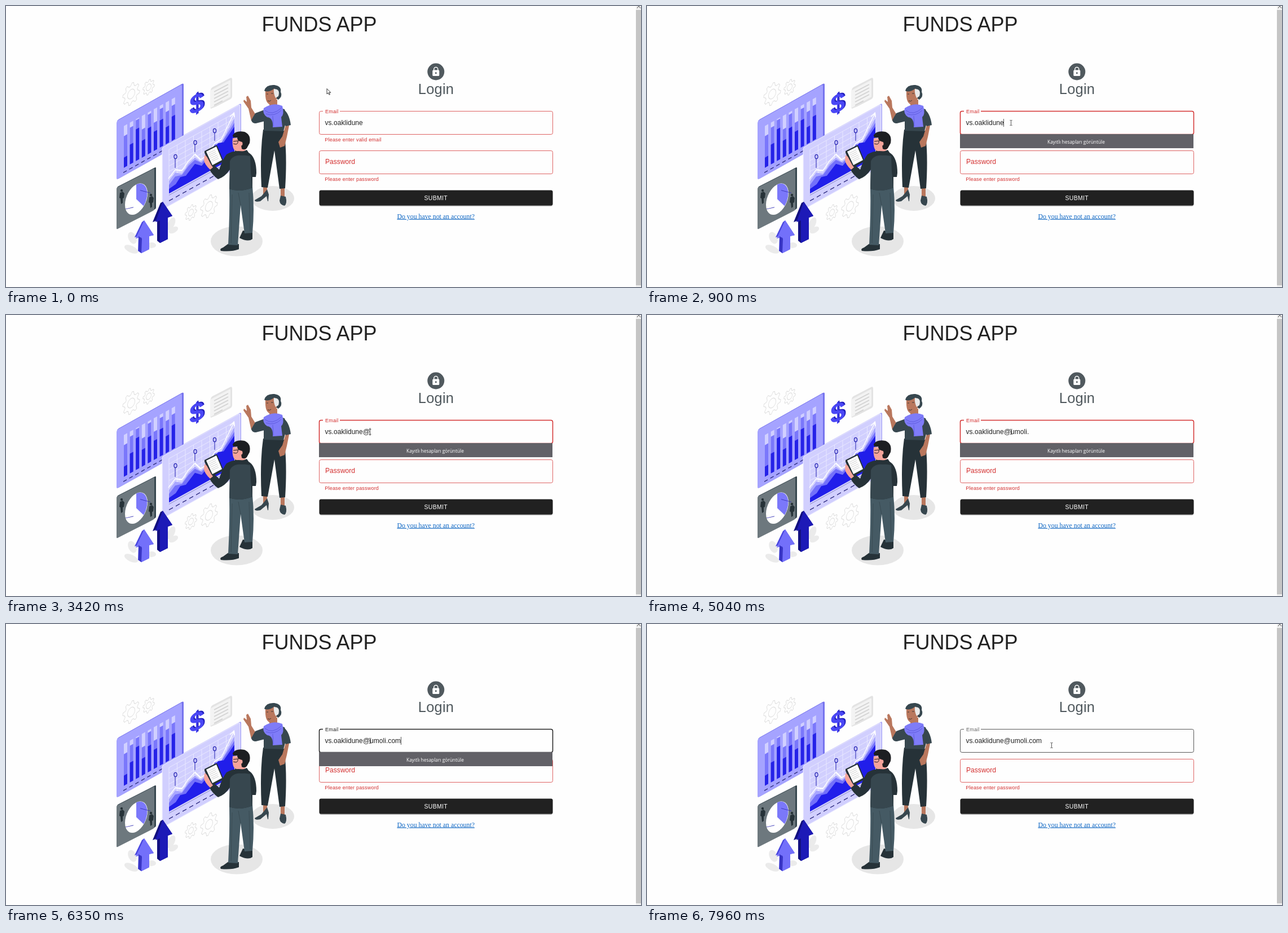
An HTML page that plays this animation: 1126x498 px, repeating every 8000 ms.

```html
<!DOCTYPE html>
<html lang="en">
<head>
<meta charset="utf-8">
<title>Login form</title>
<style>
  html, body { margin: 0; width: 100%; height: 100%; overflow: hidden; background: #fefefe; }
  svg { display: block; width: 1126px; height: 498px; }
  text { font-family: "Liberation Sans", Arial, sans-serif; fill: #212121; white-space: pre; }
  .mid { text-anchor: middle; }
  .body { font-size: 12px; letter-spacing: .05px; }
  .small { font-size: 9px; letter-spacing: .2px; }
  .error { fill: #d32f2f; }
  .box { fill: none; stroke: #d32f2f; stroke-width: .75; }
  .gear { fill: none; stroke: #e0e0e0; stroke-width: 1.2; }
  .leaf { fill: #ebebeb; }
  .dark { fill: #263238; }
  .slate { fill: #37474f; }
  .tan { fill: #b9775d; }
  .pink { fill: #f5a49b; }
</style>
</head>
<body>
<svg viewBox="0 0 1126 498">
  <g id="scrollbar">
    <rect x="1117" width="9" height="498" fill="#f1f1f1"/>
    <rect x="1117" y="7" width="9" height="488" fill="#c5c5c5"/>
    <path d="M1119 4l3-4 3 4" fill="none" stroke="#505050"/>
  </g>
  <text class="mid" x="555.5" y="45" font-size="36">FUNDS APP</text>

  <g id="scenery">
    <ellipse cx="473" cy="341" rx="38" ry="22" fill="#e6e6e6"/>
    <ellipse cx="409" cy="417" rx="46" ry="26.5" fill="#e6e6e6"/>
    <g id="gears" class="gear"></g>
    <path d="M363 149q0-3 3-5l31-16q4-2 4 2v30q0 3-3 5l-25 13-10 4z" fill="#e3e3e3"/>
    <path d="M362 150l34-18q2-1 2 1v28l-27 15-9 5z" fill="#f3f3f3"/>
    <path d="M369 152l25-13m-25 19l25-13m-25 19l25-13m-25 19l25-13m-25 19l15-8" stroke="#d2d2d2" stroke-width="1.7"/>
    <g transform="matrix(1 -.4 0 1 325 194)" font-size="47" font-weight="bold">
      <text x="2" y="-1" style="fill:#201dbb">$</text>
      <text x="0" y="0" style="fill:#4a47f5">$</text>
    </g>
  </g>

  <g transform="matrix(1 -.56 0 1 196 204)">
    <rect x="1" y="-1" width="118" height="105" rx="3" fill="#7673ed"/>
    <rect width="116" height="104" rx="3" fill="#a5a3ff"/>
    <g id="bars"></g>
    <path d="M12 98H106" stroke="#29277d" stroke-width="1.5" stroke-dasharray="6 4.6"/>
  </g>

  <g transform="matrix(1 -.555 0 1 277 251)">
    <rect x="1" y="-1" width="139" height="110" rx="3" fill="#a4a2f7"/>
    <rect width="138" height="110" rx="3" fill="#d4d3ff" fill-opacity=".94" stroke="#efeeff"/>
    <path id="grid" stroke="#eeeeff" stroke-width=".8"/>
    <path d="M12 88V66l11-9 12 9 11-11 12-5 10 13 12-2 13-13 12 1 23-30V88z" fill="#a8a6ff"/>
    <path d="M12 88V73l11-9 12 4 12-10 11-4 12 12 11-6 12-14 12 4 23-23V88z" fill="#7370fa"/>
    <path d="M12 88V80l12-2 8-8 10 3 16-12 12 10 12-8 17-16 10 4 19-17V88z" fill="#211eea"/>
    <path d="M11 61l12-9 12 8 11-10 12-6 10 15 12-1 13-14 12-1 22-33m-7 2l7-3 1 8" fill="none" stroke="#fff" stroke-width="1.8"/>
    <path d="M12 91H128" stroke="#7c7ab6" stroke-width=".7"/>
    <path d="M12 101H128" stroke="#29277d" stroke-width="1.5" stroke-dasharray="7 5"/>
  </g>
  <path d="M300 270v17m35-41v13m35-34v14" stroke="#2522b0"/>
  <g fill="#c5c3ff" stroke="#2522b0" stroke-width="1.2">
    <ellipse cx="300.5" cy="267" rx="2.6" ry="3.6"/><ellipse cx="335.5" cy="242" rx="2.6" ry="3.6"/><ellipse cx="370" cy="221" rx="2.6" ry="3.6"/>
  </g>

  <g transform="matrix(1 -.51 0 1 196 322)">
    <rect x="1" y="-1" width="69" height="74" rx="2" fill="#37474f"/>
    <rect width="67" height="74" rx="2" fill="#6d787e"/>
    <ellipse cx="35" cy="38" rx="20" ry="26" fill="#fff"/>
    <path d="M35 38V12a20 26 0 0 1 13 45z" fill="#7b78fa"/>
    <path d="M42 26l18 14M30 50l-14-4" stroke="#3431b5" stroke-width=".8"/>
  </g>
  <g class="dark">
    <path d="M202 331l5-2 3 3-1 8-2 1v8l-3 2-1-10-2-1z"/><circle cx="205" cy="327" r="2.2"/>
    <path d="M254 339l5-2 3 3-1 8-2 1v7l-3 2-1-9-2-1z"/><circle cx="257" cy="335" r="2.2"/>
  </g>

  <g class="leaf">
    <ellipse cx="224" cy="411" rx="7" ry="11" transform="rotate(-25 224 411)"/>
    <ellipse cx="222" cy="431" rx="13" ry="6" transform="rotate(25 222 431)"/>
    <ellipse cx="258" cy="424" rx="8" ry="5"/>
    <ellipse cx="293" cy="386" rx="6" ry="12" transform="rotate(25 293 386)"/>
    <ellipse cx="297" cy="397" rx="9" ry="5" transform="rotate(-30 297 397)"/>
  </g>
  <path d="M241 383l4-3 17 26-9 2 1 23-14 7-6-4 1-26-7 2z" fill="#4a47df"/>
  <path d="M245 380l17 26-8 2v23l-14 7v-28l-10 2z" fill="#7370fa"/>
  <path d="M235 408l6 4-1 26-5-4z" fill="#3734c4"/>
  <path d="M274 349l4-2 17 25-8 3v38l-14 7-5-4v-36l-8 3z" fill="#121080"/>
  <path d="M278 347l17 25-8 3v38l-14 7v-40l-8 3z" fill="#1d1ab7"/>

  <g id="woman">
    <path class="tan" d="M435 204l-5-22-9-13 1-3 5 4-1-9 3-2 5 9 1 12 8 13z"/>
    <path class="slate" d="M435 202l7-12 16-6 5 19-20 5q-7 0-8-6z"/>
    <path class="tan" d="M456 320h7v14h-7zM487 322h7v16h-7zM467 166h14v16h-14z"/>
    <path class="dark" d="M456 219l37 2q6 41 2 102l-10 1-9-68-12 66-11-1q-3-60 3-102z"/>
    <path class="slate" d="M457 184q17-8 37-1l4 17-6 22-35-1z"/>
    <path class="tan" d="M496 211l6 1-4 20-4 16-8 3-3-10 7-10z"/>
    <path class="slate" d="M490 182q12 6 15 29l-9 2-6-11z"/>
    <path d="M457 181q17-11 33-4 4 15-2 20l2 17-17 1q1-17-10-18-9-6-6-16z" fill="#7f7cf8"/>
    <path d="M459 185q13 11 30-5m-28 11q14 6 27-6m-15 10l1 19" fill="none" stroke="#5754d8" stroke-width=".8"/>
    <path class="slate" d="M458 150q3-11 18-10 13 2 11 12 4 8-4 14l-13-7z"/>
    <path class="tan" d="M460 151q8 2 16-5 5 10 4 18-4 11-13 10-8-3-7-23z"/>
    <path d="M475 147q12 0 8 13l-5 3q-4-9-3-16z" fill="#e9e9e9"/>
    <path d="M462 156h3m5-1h4m-10 13q4 2 6-1" fill="none" stroke="#37312f" stroke-width=".9"/>
    <path class="slate" d="M463 325l3 9-1 12h-1l-2-9-11 9q-10 2-10-2l12-7zM487 336l9 2q3 12-2 16-8-1-9-9z"/>
  </g>

  <g id="man">
    <path class="pink" d="M402 234q-2 20 6 24l10 5 9-11 2-16z"/>
    <path d="M402 229q5-9 21-6 12 5 9 20l-5 9q-4 4-9 1l-2-13q-6-1-6-7-8 2-8-4z" fill="#1d1f22"/>
    <ellipse class="pink" cx="417" cy="244" rx="2.500" ry="3.500"/>
    <path d="M403 240l8-1q1 6-4 6l-4-1m8-5l6-1" fill="none" stroke="#1d1f22"/>
    <path class="dark" d="M420 398l17 2v13q-8 6-23-2zM396 420l17 2v9q-13 5-32 3-3-4 4-6z"/>
    <path d="M396 322q20 8 41-2 4 40 0 82l-14 1-7-50-5 71-17-1q3-56 2-101z" fill="#455a64"/>
    <path d="M416 353l-4-22m19 0l2 68m-32-65l-2 86" fill="none" stroke="#37474f" stroke-width=".8"/>
    <path class="dark" d="M391 263q17-11 41-2 12 9 12 35l-1 7h-6l0 19q-23 9-41 2l1-34q-9 13-21 17-10-7-15-17l9-7 8 7q6-18 13-27z"/>
    <path class="slate" d="M397 275q6-15 36-9l1 27 3 29q-23 9-41 2z"/>
    <path class="dark" d="M406 256q10 5 21-1l4 6q-12 7-25 1z"/>
    <path class="dark" d="M352 257l20-10q2-1 3 2l10 24q1 3-2 4l-17 9q-2 1-4-2l-10-24z"/>
    <path d="M355 258l18-9 10 24-17 9z" fill="#fff"/>
    <path d="M359 261l12-6m-11 9l12-6m-11 9l12-6m-11 9l13-6m-11 9l12-6m-10 8l11-5" stroke="#bbb" stroke-width=".7"/>
    <path class="pink" d="M352 264l4 3 8 15 3 4-5 4q-10-9-11-17z"/>
  </g>

  <circle cx="762.3" cy="116.5" r="15" fill="#50595e"/>
  <path d="M758.8 114v-2a3.5 3.5 0 0 1 7 0v2" fill="none" stroke="#fff" stroke-width="1.5"/>
  <rect x="756.3" y="113.6" width="12" height="10.4" rx="1.5" fill="#fff"/>
  <circle cx="762.3" cy="118.8" r="1.5" fill="#50595e"/>
  <text class="mid" x="762.5" y="156" font-size="25.5" letter-spacing=".19" style="fill:#50595e">Login</text>

  <path id="emailBox" class="box" d="M592 186.5H966.5a3 3 0 0 1 3 3V224.5a3 3 0 0 1-3 3H558.5a3 3 0 0 1-3-3V189.5a3 3 0 0 1 3-3H562"/>
  <text id="emailLabel" class="small" x="566" y="189.5">Email</text>
  <text id="email" class="body" x="565.5" y="211"></text>
  <text id="emailError" class="small error" x="565.3" y="240">Please enter valid email</text>

  <g id="lower">
    <rect class="box" x="555.5" y="256.5" width="414" height="41" rx="3"/>
    <text class="body error" x="566" y="280">Password</text>
    <text class="small error" x="565.3" y="310">Please enter password</text>
    <rect x="556" y="328.5" width="413" height="26.5" rx="3" fill="#000" opacity=".2"/>
    <rect x="555.5" y="327.5" width="414" height="27" rx="3" fill="#000" opacity=".2"/>
    <rect x="555.5" y="326.5" width="414" height="27" rx="3" fill="#212121"/>
    <text class="mid" x="762.3" y="344" font-size="10.5" letter-spacing=".3" style="fill:#fff">SUBMIT</text>
    <text class="mid" x="762.2" y="376.5" font-size="11.82" text-decoration="underline"
      style="font-family:'Liberation Serif','Times New Roman',serif;fill:#1068c4">Do you have not an account?</text>
  </g>

  <g id="dropdown">
    <rect x="555" y="227" width="414" height="25" fill="#626167"/>
    <text class="mid" x="761" y="243.6" font-size="8.4" style="font-family:'Open Sans','Noto Sans',sans-serif;fill:#fff">Kayıtlı hesapları görüntüle</text>
  </g>

  <rect id="caret" y="200" width="1" height="14" fill="#555"/>
  <rect id="pageCaret" x="731" y="133" width="1" height="28" fill="#333"/>
  <g id="pointer">
    <circle id="click" r="9" fill="#fdf777"/>
    <path id="arrow" d="M.5.5V10l2.3-2.1 1.7 3.5 1.5-.7-1.6-3.3H7.3z" fill="#fff" stroke="#222" stroke-width=".9"/>
    <path id="beam" d="M-2-4.5h1.5l.5.5.5-.5H2M0-4V4M-2 4.5h1.5L0 4l.5.5H2" fill="none" stroke="#444" stroke-width=".9"/>
  </g>
</svg>
<script>
const LOOP = 8000;
const ADDRESS = 'vs.oaklidune@umoli.com';
const PRESET = 12;
const KEY_TIMES = [2280, 4120, 4270, 4350, 4500, 4730, 4960, 5270, 6130, 6350];
const CARET_ON = [[830, 1360], [1890, 2890], [3420, 3960], [4120, 4500], [4730, 5040], [5270, 5590], [6130, 6660], [7130, 7280]];
const FOCUS = 830, MENU = 900, VALID = 5270, BLUR = 7280;
const MOVES = [
  { start: 80, end: 520, steps: 7, from: [568.5, 146], to: [645.5, 207] },
  { start: 6890, end: 7130, steps: 4, from: [645.5, 207], to: [681, 148] },
  { start: 7360, end: 7960, steps: 9, from: [681, 148], to: [717.5, 215] }
];

const $ = id => document.getElementById(id);
const within = (t, from, to) => t >= from && t < to;
const show = (id, on) => $(id).setAttribute('visibility', on ? 'visible' : 'hidden');

function gear(x, y, size) {
  const teeth = 8, points = [];
  for (let i = 0; i < teeth * 4; i++) {
    const angle = (i + .5) * Math.PI / teeth / 2;
    const r = size * (i % 4 < 2 ? 1 : .75);
    points.push([Math.cos(angle) * r, Math.sin(angle) * r].map(v => v.toFixed(1)));
  }
  return `<g transform="matrix(.8 -.42 0 1 ${x} ${y})">
    <polygon points="${points.join(' ')}"/><circle r="${size * .43}"/></g>`;
}

function bar(dark, i) {
  const x = 13 + i * 10.6, middle = [56, 65, 72, 50, 70, 50, 68, 57, 62][i];
  const part = (height, color) =>
    `<rect x="${x}" y="${90 - height}" width="6" height="${height}" fill="${color}"/>`;
  return part(74, '#d1d0ff') + part(middle, '#7a77fb') + part(dark, '#2522e8');
}

$('gears').innerHTML = gear(222, 156, 19) + gear(253, 144, 13) + gear(328, 366, 13) + gear(360, 355, 19);
$('bars').innerHTML = [18, 35, 56, 30, 46, 34, 48, 30, 43].map(bar).join('');
$('grid').setAttribute('d', Array.from({ length: 9 }, (_, i) =>
  `M${12 + i * 14.5} 10V88M12 ${10 + i * 9.75}H128`).join(''));

function pointerAt(t) {
  const move = MOVES.filter(m => t >= m.start).pop();
  if (!move) return MOVES[0].from;
  const span = (move.end - move.start) / (move.steps - 1);
  const p = Math.min(1, (Math.floor((t - move.start) / span) + 1) / move.steps);
  const eased = p * p * (3 - 2 * p);
  return move.from.map((v, i) => v + (move.to[i] - v) * eased);
}

function draw(t) {
  const [x, y] = pointerAt(t);
  const hover = y > 186 && y < 228;
  const focused = within(t, FOCUS, BLUR);
  const valid = t >= VALID;

  $('email').textContent = ADDRESS.slice(0, PRESET + KEY_TIMES.filter(k => t >= k).length);
  $('caret').setAttribute('x', Math.floor(565.5 + $('email').getComputedTextLength()));
  show('caret', CARET_ON.some(([on, off]) => within(t, on, off)));
  show('pageCaret', within(t, 80, 520) || within(t, BLUR, 7810));

  const idle = hover ? '#212121' : '#c4c4c4';
  $('emailBox').style.stroke = !valid ? '#d32f2f' : focused ? '#212121' : idle;
  $('emailBox').style.strokeWidth = focused ? 1.5 : .75;
  $('emailLabel').style.fill = !valid ? '#d32f2f' : focused ? '#212121' : '#666';
  show('emailError', !valid);
  show('dropdown', within(t, MENU, BLUR));
  $('lower').setAttribute('transform', `translate(0 ${valid ? -17 : 0})`);

  $('pointer').setAttribute('transform', `translate(${x} ${y})`);
  show('beam', hover);
  show('arrow', !hover);
  show('click', within(t, FOCUS, MENU) || within(t, BLUR, 7360));
}

const begin = performance.now();
function tick() {
  draw((performance.now() - begin) % LOOP);
  requestAnimationFrame(tick);
}
tick();
</script>
</body>
</html>
```
